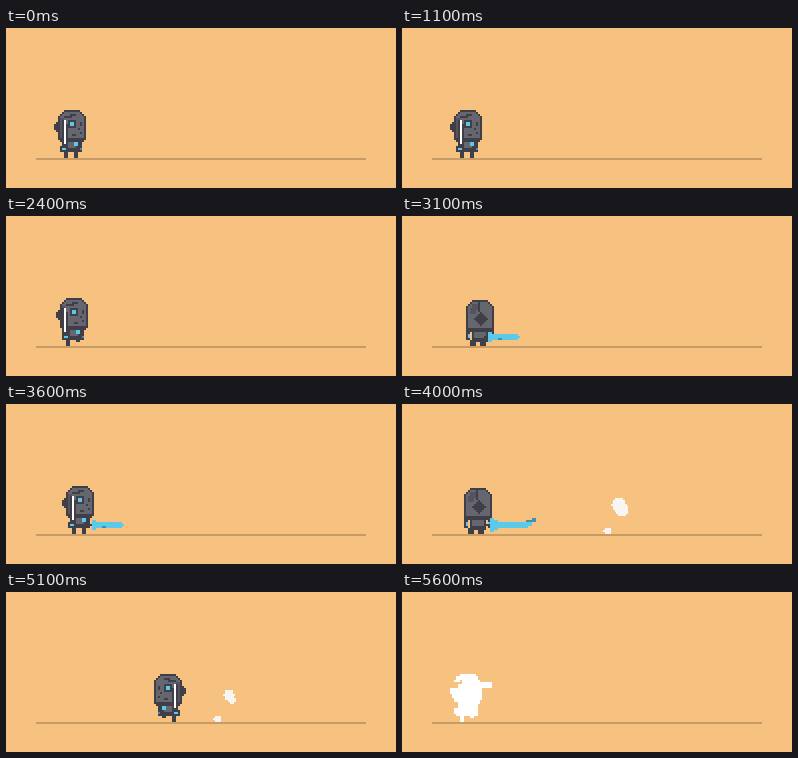
An HTML page with a canvas that plays this animation: 390x160 px, repeating every 5.7 s.

```html
<!DOCTYPE html>
<html lang="en">
<head>
<meta charset="utf-8">
<title>Pixel fighter</title>
<style>
html, body { margin: 0; width: 100%; height: 100%; overflow: hidden; background: #f7c27f; }
canvas { display: block; width: 390px; height: 160px; image-rendering: pixelated; }
</style>
</head>
<body>
<canvas id="stage" width="390" height="160"></canvas>
<script>
const ctx = document.getElementById('stage').getContext('2d');
const LOOP = 5700, STEP = 100, CELL = 2;
const DARK = '#403e49', GREY = '#66666f', MID = '#55545e', CYAN = '#5bc9ea', BLUE = '#3f91b4';
const WHITE = '#ffffff', SKIN = '#f7c27f', SMOKE = '#f7f6f4';
let tint = null;

function box(color, x, y, w = 1, h = 1) {
  ctx.fillStyle = tint || color;
  ctx.fillRect(x * CELL, y * CELL, w * CELL, h * CELL);
}

// Runs a drawing with its origin at x, y; a flip mirrors it within the given width.
function place(x, y, flip, width, draw) {
  ctx.save();
  ctx.translate(flip ? x + width : x, y);
  if (flip) ctx.scale(-1, 1);
  draw();
  ctx.restore();
}

function hood(left, width, rows) {
  box(DARK, left + 3, 0, width - 6);
  box(DARK, left + 2, 1, width - 4);
  box(DARK, left + 1, 2, width - 2, rows - 2);
  box(DARK, left, 3, width, rows - 4);
  box(GREY, left + 3, 1, width - 6);
  box(GREY, left + 2, 2, width - 4);
  box(GREY, left + 1, 3, width - 2, rows - 5);
}

function legs(a, b, lift) {
  box(DARK, a, 20, 2, lift === 1 ? 2 : 4);
  box(DARK, b, 20, 2, lift === 2 ? 2 : 4);
}

function sideBody(lift) {
  box(DARK, 5, 14, 9, 6);
  box(GREY, 7, 15, 4, 4);
  box(DARK, 3, 18, 4, 3);
  box(DARK, 7, 20, 5);
  box(DARK, 12, 16, 2, 5);
  box(CYAN, 10, 16, 2, 2);
  box(CYAN, 4, 19, 2);
  box(BLUE, 13, 19);
  legs(5, 10, lift);
}

function blade(x = 5) {
  box(DARK, x - 1, 5, 1, 12);
  box(WHITE, x, 5, 1, 12);
  box(DARK, x + 1, 7, 1, 10);
  box(DARK, x - 1, 17, 3);
}

function side(lift = 0, bladeX = 5) {
  sideBody(lift);
  box(DARK, 0, 7, 3, 3);
  box(DARK, 1, 6, 2, 5);
  hood(2, 14, 16);
  box(MID, 3, 4, 2, 10);
  box(DARK, 5, 3, 4);
  box(DARK, 8, 2, 3);
  box(DARK, 7, 5, 4, 4);
  box(CYAN, 8, 6, 2, 2);
  box(DARK, 13, 6, 1, 2);
  box(DARK, 12, 9);
  box(DARK, 9, 12, 2);
  box(DARK, 13, 11);
  blade(bladeX);
}

function punch(reach, lean = 0, lift = 0) {
  sideBody(lift);
  box(DARK, 2, 17, 3, 3);
  // Cape behind the head
  box(DARK, -lean, 7, 6 + lean, 3);
  box(DARK, 1, 10, 5, 2);
  box(DARK, 2, 12, 4, 2);
  // Brim and face
  box(DARK, 5, 0, 8);
  box(DARK, 3, 1, 11, 2);
  box(DARK, 2, 3, 3);
  box(DARK, 6, 3, 9, 11);
  box(DARK, 15, 4, 1, 9);
  box(DARK, 8, 14, 6);
  box(GREY, 6, 1, 6, 2);
  box(GREY, 9, 3, 5, 10);
  box(DARK, 7, 3, 6);
  box(SKIN, 7, 4, 3, 3);
  box(MID, 7, 8, 3, 5);
  box(DARK, 11, 9);
  box(DARK, 10, 12, 2);
  // Outstretched arm
  box(DARK, 13, 4, reach - 13, 3);
  box(GREY, 14, 5, reach - 16);
  box(CYAN, 12, 6, 3);
  box(CYAN, 14, 14);
  blade();
}

function back() {
  box(DARK, 3, 15, 8, 6);
  box(DARK, 0, 15, 2, 5);
  box(DARK, 12, 15, 2, 5);
  box(GREY, 4, 16, 6, 3);
  box(CYAN, 1, 17, 1, 2);
  box(CYAN, 12, 17, 1, 2);
  box(DARK, 2, 20, 3, 3);
  box(DARK, 7, 20, 3, 3);
  hood(0, 14, 16);
  box(MID, 3, 2, 4, 3);
  box(MID, 2, 4, 3, 3);
  box(DARK, 6, 1, 1, 5);
  for (let i = 0; i < 4; i++) box(DARK, 7 - i, 6 + i, 1 + 2 * i);
  for (let i = 0; i < 3; i++) box(DARK, 5 + i, 10 + i, 5 - 2 * i);
}

// Blade from hilt x to tip x; the long one curves upward.
function sword(hilt, tip, long) {
  const dir = Math.sign(tip - hilt);
  const span = (x0, x1, y, h, color) => {
    ctx.fillStyle = color;
    const a = hilt + dir * x0, b = hilt + dir * x1;
    ctx.fillRect(Math.min(a, b), y, Math.abs(b - a), h);
  };
  const n = Math.abs(tip - hilt);
  span(-4, 0, 120, 2, DARK);
  if (long) {
    span(0, 4, 114, 14, CYAN);
    span(4, 8, 116, 10, CYAN);
    span(8, n - 16, 118, 6, CYAN);
    span(n - 16, n - 8, 118, 6, CYAN);
    span(n - 8, n - 4, 118, 4, CYAN);
    span(n - 10, n - 4, 116, 2, BLUE);
    span(n - 4, n, 114, 4, BLUE);
  } else {
    span(0, 4, 116, 10, CYAN);
    span(4, n - 2, 118, 6, CYAN);
    span(n - 2, n, 120, 2, CYAN);
    span(10, 14, 122, 2, BLUE);
  }
}

function puff(x, y, r) {
  ctx.fillStyle = SMOKE;
  for (let dy = -r; dy < r; dy += CELL) {
    const w = Math.round(Math.sqrt(r * r - (dy + 1) ** 2) / CELL) * CELL;
    ctx.fillRect(x - w, y + dy, w * 2, CELL);
  }
}

function smoke(x, age) {
  const size = [4, 6, 8, 8, 6, 4][age];
  if (!size) return;
  const y = 106 - age * 2;
  puff(x - 1, y - 1, size - 1);
  puff(x + 2, y + 4, size - 2);
  if (age < 5) {
    ctx.fillStyle = SMOKE;
    ctx.fillRect(x - 15, 124, 6, 2);
    ctx.fillRect(x - 17, 126, 8, 2);
    ctx.fillRect(x - 15, 128, 6, 2);
  }
}

function spin(k) {
  const long = k >= 12, phase = k % 3;
  if (phase === 0) {
    place(long ? 62 : 64, 84, false, 28, back);
    sword(long ? 88 : 86, long ? 134 : 118, long);
  } else if (phase === 1) {
    place(58, 82, true, 32, side);
    sword(62, long ? 18 : 30, long);
  } else {
    place(56, 82, false, 32, side);
    sword(86, long ? 134 : 118, long);
  }
}

function hero(tick) {
  const stand = () => place(48, 82, false, 32, side);
  const hit = (reach, lean) => place(48, 82, false, 32, () => punch(reach, lean));
  if (tick >= 5 && tick < 9) return hit([19, 23, 23, 20][tick - 5], 0);
  if (tick >= 11 && tick < 15) {
    if (tick === 11) return stand();
    return hit([18, 21, 19][tick - 12], [1, 3, 2][tick - 12]);
  }
  if (tick < 19) return stand();
  if (tick < 25) {
    const k = tick - 19;
    return place(k % 2 ? 50 : 52, k % 3 === 1 ? 80 : 82, false, 32, () => side(k % 2 ? 2 : 1, 4));
  }
  if (tick < 43) {
    spin(tick - 25);
    if (tick >= 38) smoke(218, tick - 38);
    return;
  }
  if (tick === 43) {
    tint = WHITE;
    place(58, 82, false, 32, side);
    tint = null;
    return;
  }
  if (tick < 48) {
    tint = tick === 44 ? WHITE : null;
    place(278, 82, true, 32, () => punch(tick < 46 ? 18 : 24));
    tint = null;
    return;
  }
  if (tick < 55) {
    const k = tick - 48;
    place(238 - k * 30, 82, true, 32, () => side(k % 2 + 1));
    if (k > 1) smoke(224, k - 2);
    return;
  }
  tint = WHITE;
  place(48, 82, false, 32, () => punch(21, 0, 2));
  tint = null;
}

let start;
function show(now) {
  start ??= now;
  const tick = Math.floor(((now - start) % LOOP) / STEP);
  ctx.fillStyle = '#f7c27f';
  ctx.fillRect(0, 0, 390, 160);
  ctx.fillStyle = '#c69b65';
  ctx.fillRect(30, 130, 330, 2);
  hero(tick);
  requestAnimationFrame(show);
}
requestAnimationFrame(show);
</script>
</body>
</html>
```
